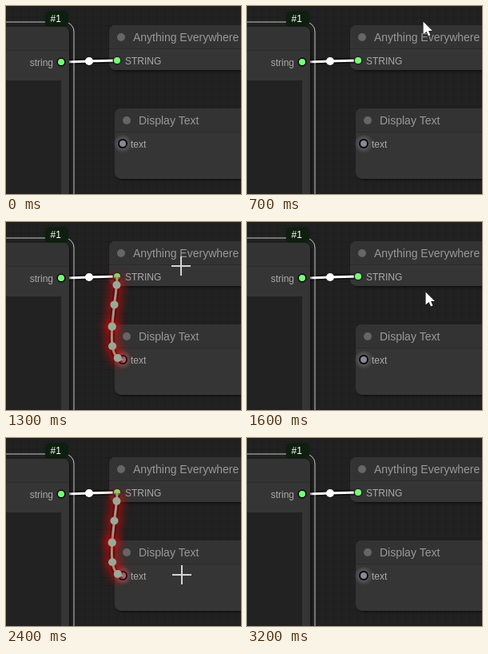
An HTML page with a canvas for the animation above (4.4 s loop, 294 px wide and 235 px high).

```html
<!DOCTYPE html>
<html lang="en">
<head>
<meta charset="utf-8">
<title>Node graph hover</title>
<style>
  html, body { margin: 0; width: 100%; height: 100%; overflow: hidden; background: #212121; }
  canvas { display: block; }
</style>
</head>
<body>
<canvas id="stage" width="294" height="235"></canvas>
<script>
const W = 294, H = 235, STEP = 100, LOOP = 4400;
const ctx = document.getElementById('stage').getContext('2d');
const FONT = '"Liberation Sans", Arial, sans-serif';

// Pointer path: [step, x, y]
const PATH = [
  [1, 269, -8], [3, 243, 0], [5, 223, 8], [6, 218, 12], [7, 220, 19], [8, 219, 25],
  [12, 219, 48], [13, 219, 55], [14, 220, 64], [15, 222, 75], [16, 223, 87],
  [18, 224, 108], [20, 223, 128], [21, 222, 137], [24, 220, 171], [26, 218, 193],
  [28, 218, 212], [30, 218, 228], [31, 218, 232]
];

const NODES = [
  { x: 129, y: 24, h: 56, title: 'Anything Everywhere' },
  { x: 136, y: 128, h: 88, title: 'Display Text' }
];

const WHITE_LINK = [[69, 70], [86, 70], [122, 68], [139, 68]];
const HOVER_LINK = [[139, 69], [139, 95], [120, 172], [146, 172]];

function bezier(p, t) {
  const u = 1 - t;
  return [0, 1].map(i =>
    p[0][i] * u ** 3 + 3 * p[1][i] * t * u * u + 3 * p[2][i] * t * t * u + p[3][i] * t ** 3);
}

function disc(x, y, r, color) {
  ctx.fillStyle = color;
  ctx.beginPath();
  ctx.arc(x, y, r, 0, 2 * Math.PI);
  ctx.fill();
}

function box(x, y, w, h, r, color) {
  ctx.fillStyle = color;
  ctx.beginPath();
  ctx.roundRect(x, y, w, h, r);
  ctx.fill();
}

function label(text, x, y, size, color, align = 'left') {
  ctx.font = `${size}px ${FONT}`;
  ctx.fillStyle = color;
  ctx.textAlign = align;
  ctx.fillText(text, x, y);
}

function strokeLink(p, color) {
  ctx.beginPath();
  ctx.moveTo(...p[0]);
  ctx.bezierCurveTo(...p[1], ...p[2], ...p[3]);
  for (const [width, style] of [[7, 'rgba(0,0,0,.5)'], [3, color]]) {
    ctx.lineWidth = width;
    ctx.strokeStyle = style;
    ctx.stroke();
  }
  disc(...bezier(p, 0.5), 5, color);
}

function drawGrid() {
  ctx.fillStyle = '#212121';
  ctx.fillRect(0, 0, W, H);
  ctx.fillStyle = '#1d1d1d';
  for (let x = 8; x < W; x += 10) ctx.fillRect(x, 0, 1, H);
  for (let y = 4; y < H; y += 10) ctx.fillRect(0, y, W, 1);
}

function drawNode(x, y, w, h) {
  ctx.save();
  ctx.shadowColor = 'rgba(0,0,0,.5)';
  ctx.shadowBlur = 3;
  ctx.shadowOffsetX = ctx.shadowOffsetY = 2;
  box(x, y, w, h, 8, '#353535');
  ctx.restore();
  box(x, y, w, 30, [8, 8, 0, 0], '#333');
  ctx.fillStyle = '#2b2b2b';
  ctx.fillRect(x, y + 29, w, 1);
}

function drawSourceNode() {
  drawNode(-80, 26, 159, 260);
  ctx.fillStyle = '#222';
  ctx.fillRect(0, 93, 69, H);
  ctx.strokeStyle = 'rgba(255,255,255,.75)';
  ctx.lineWidth = 1;
  ctx.beginPath();
  ctx.roundRect(-86, 20, 171, 280, 12);
  ctx.stroke();
  box(49, 6, 29, 20, 5, '#0f1f0f');
  label('#1', 55.5, 20, 12, '#fff');
  label('string', 59, 75, 12, '#aaa', 'right');
  disc(69, 70, 5.5, '#080808');
  disc(69, 70, 4, '#7f7');
}

function drawScene() {
  drawGrid();
  for (const n of NODES) {
    drawNode(n.x, n.y, 220, n.h);
    disc(n.x + 15, n.y + 15, 5, '#666');
    label(n.title, n.x + 30, n.y + 20, 14, '#999');
  }
  strokeLink(WHITE_LINK, '#fff');
  disc(139, 68, 5.5, '#262626');
  disc(139, 68, 4, '#7f7');
  label('STRING', 149, 73, 12, '#aaa');

  const halo = ctx.createRadialGradient(146, 172, 5, 146, 172, 12);
  halo.addColorStop(0, 'rgba(255,255,255,.2)');
  halo.addColorStop(1, 'rgba(255,255,255,0)');
  disc(146, 172, 12, halo);
  disc(146, 172, 6, '#050505');
  disc(146, 172, 4, '#8b8799');
  label('text', 156, 177, 12, '#aaa');
  drawSourceNode();
}

function drawHoverLink(step) {
  const color = '#9a9';
  const flow = 0.105 + 0.1092 * (step - 13) + 2;
  ctx.save();
  ctx.shadowColor = '#f00';
  ctx.shadowBlur = 14;
  strokeLink(HOVER_LINK, color);
  for (let i = 0; i < 5; i++) disc(...bezier(HOVER_LINK, (flow + i * 0.2) % 1), 5, color);
  ctx.restore();
}

function pointerAt(step) {
  const i = PATH.findIndex(p => p[0] >= step);
  if (i < 0 || step < PATH[0][0]) return null;
  const b = PATH[i], a = PATH[Math.max(0, i - 1)];
  const k = b === a ? 0 : (step - a[0]) / (b[0] - a[0]);
  return [1, 2].map(j => Math.round(a[j] + (b[j] - a[j]) * k));
}

function drawArrow(x, y) {
  ctx.save();
  ctx.translate(x + 0.5, y + 0.5);
  ctx.fillStyle = '#fff';
  ctx.strokeStyle = '#000';
  ctx.lineWidth = 1;
  ctx.stroke(arrow);
  ctx.fill(arrow);
  ctx.restore();
}
const arrow = new Path2D('M0 0V16L4 12.5L6.5 18L9 17L6.6 11.5H11.5Z');

function drawCross(x, y) {
  ctx.fillStyle = '#d4d4d4';
  ctx.fillRect(x - 12, y - 1, 24, 2);
  ctx.fillRect(x - 1, y - 12, 2, 24);
}

function render(time) {
  const step = Math.floor((time % LOOP) / STEP);
  const pointer = pointerAt(step);
  drawScene();
  if (pointer) {
    const [x, y] = pointer;
    const hovering = NODES.some(n => x >= n.x && y >= n.y && y < n.y + n.h);
    if (hovering) drawHoverLink(step);
    (hovering ? drawCross : drawArrow)(x, y);
  }
}

const start = performance.now();
function tick() {
  render(performance.now() - start);
  requestAnimationFrame(tick);
}
tick();
</script>
</body>
</html>
```
